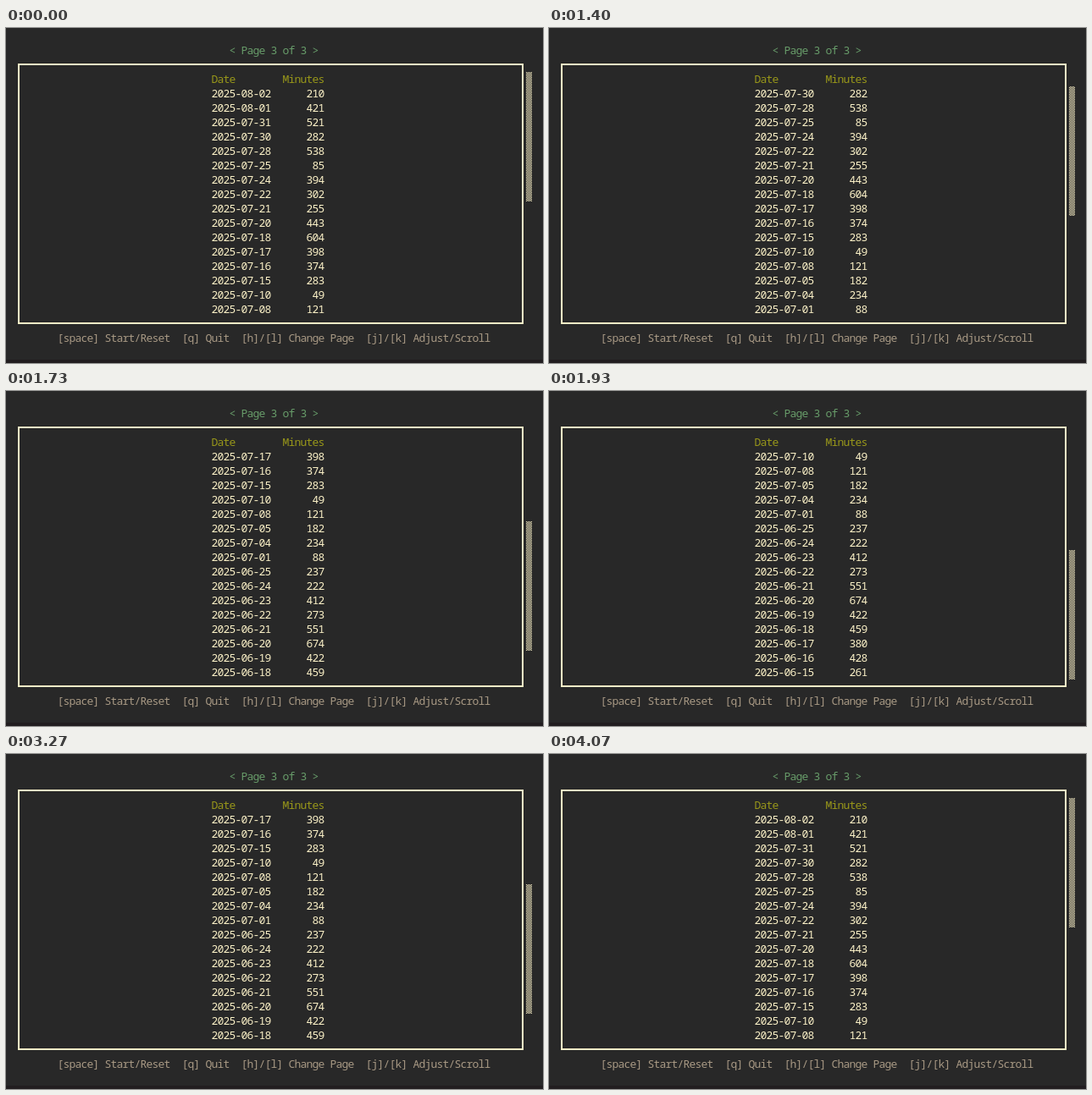
An HTML page for the animation above (4530 ms loop, 634x396 px).

```html
<!DOCTYPE html>
<html lang="en">
<head>
<meta charset="utf-8">
<title>Minutes log</title>
<style>
  html, body { margin: 0; width: 100%; height: 100%; overflow: hidden; background: #282828; }
  svg { display: block; }
  text {
    font: 13px "Noto Sans Mono", "DejaVu Sans Mono", monospace;
    font-stretch: condensed;
    font-variant-ligatures: none;
    white-space: pre;
  }
</style>
</head>
<body>
<svg id="stage" width="634" height="396" viewBox="0 0 634 396">
  <defs>
    <pattern id="shade" width="2" height="2" patternUnits="userSpaceOnUse">
      <path d="M0 0h1v1h-1zM1 1h1v1h-1z" fill="#fbf1c7" shape-rendering="crispEdges"/>
    </pattern>
  </defs>
  <rect width="634" height="396" fill="#282828"/>
  <rect y="392" width="634" height="4" fill="#221e20"/>
  <rect x="15" y="43" width="595" height="306" fill="none" stroke="#fbf1c7" stroke-width="2"/>
  <rect id="thumb" x="614" y="52" width="7" height="153" fill="url(#shade)"/>
</svg>
<script>
const LOOP = 4530, FRAME = 1000 / 15, REPEAT = 40;
const CELL = 7, LINE = 17, VISIBLE = 16;
const FG = '#fbf1c7';

const log = `08-02 210,08-01 421,07-31 521,07-30 282,07-28 538,07-25 85,
07-24 394,07-22 302,07-21 255,07-20 443,07-18 604,07-17 398,
07-16 374,07-15 283,07-10 49,07-08 121,07-05 182,07-04 234,
07-01 88,06-25 237,06-24 222,06-23 412,06-22 273,06-21 551,
06-20 674,06-19 422,06-18 459,06-17 380,06-16 428,06-15 261`
  .split(',').map(entry => {
    const [day, minutes] = entry.trim().split(' ');
    return '2025-' + day + minutes.padStart(9);
  });
const maxOffset = log.length - VISIBLE;

const stage = document.getElementById('stage');
const thumb = document.getElementById('thumb');

function addText(x, line, fill, content) {
  const el = document.createElementNS('http://www.w3.org/2000/svg', 'text');
  el.setAttribute('y', 14 + line * LINE);
  el.setAttribute('fill', fill);
  el.textContent = content;
  stage.appendChild(el);
  // Fit the font's own advance to the terminal grid.
  const gap = CELL - el.getComputedTextLength() / content.length;
  el.style.letterSpacing = gap + 'px';
  el.setAttribute('x', x + gap / 2);
  return el;
}

addText(264, 1, '#689d6a', '< Page 3 of 3 >');
addText(243, 3, '#98971a', 'Date        Minutes');
addText(61, 21, '#a89984',
  '[space] Start/Reset  [q] Quit  [h]/[l] Change Page  [j]/[k] Adjust/Scroll');
const rows = log.slice(0, VISIBLE).map((row, i) => addText(243, 4 + i, FG, row));

// Rows moved by a held key that began to act at the given tick.
function held(tick, start) {
  if (tick < start) return 0;
  const steps = 3 + Math.floor(((tick - start) * FRAME + 10) / REPEAT);
  return Math.min(maxOffset, steps);
}

let shown = -1;
function draw(time) {
  const tick = Math.floor((time % LOOP + 5) / FRAME);
  const offset = held(tick, 21) - held(tick, 49);
  if (offset === shown) return;
  shown = offset;
  rows.forEach((row, i) => { row.textContent = log[offset + i]; });
  thumb.setAttribute('y', 52 + LINE * Math.floor(offset * 0.56 + 0.28));
}

const begin = performance.now();
function loop() {
  draw(performance.now() - begin);
  requestAnimationFrame(loop);
}
loop();
</script>
</body>
</html>
```
